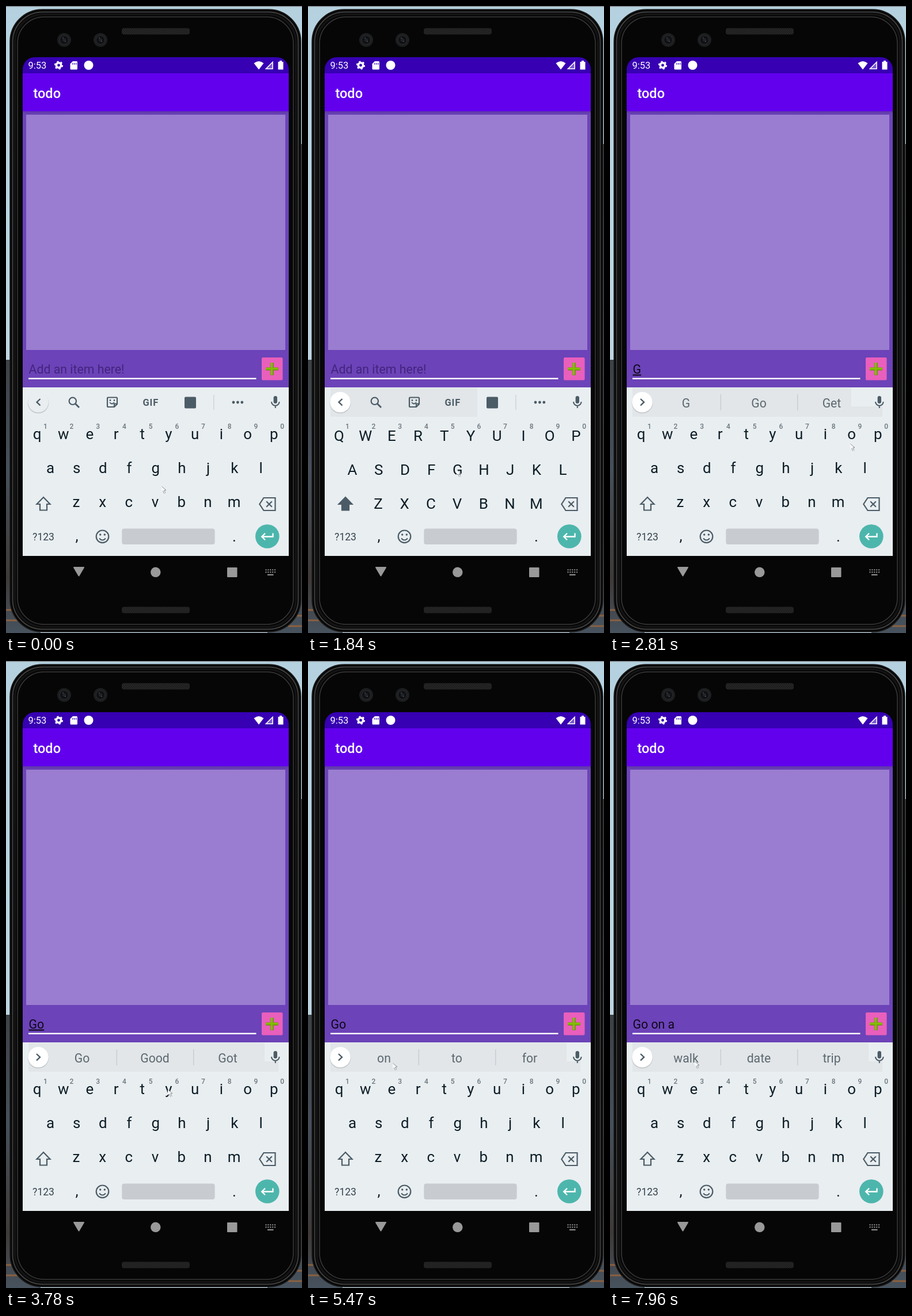
Write an HTML page that moves like this. It is 514 px wide and 1090 px high and loops after 8 s.

```html
<!DOCTYPE html>
<html lang="en">
<head>
<meta charset="utf-8">
<title>todo</title>
<style>
  html, body { margin: 0; width: 100%; height: 100%; overflow: hidden; background: #111; }
  svg { display: block; width: 514px; height: 1090px; font-family: Roboto, sans-serif; }
  .mid { text-anchor: middle; }
  .key { font-size: 25.9px; fill: #0c1d26; text-anchor: middle; }
  .hint { font-size: 12px; fill: #6b767c; font-weight: 500; text-anchor: middle; }
  .word { font-size: 21.2px; fill: #5c686f; text-anchor: middle; }
  .line { fill: none; stroke: #4b5c66; stroke-width: 2.2; }
  .icon { fill: #4b5c66; }
  .field { font-size: 21.3px; }
</style>
</head>
<body>
<svg viewBox="0 0 514 1090" xmlns="http://www.w3.org/2000/svg">
  <defs>
    <linearGradient id="sky" x1="0" y1="0" x2="0" y2="1">
      <stop offset="0" stop-color="#b5d1df"/><stop offset="1" stop-color="#c3d9e3"/>
    </linearGradient>
    <linearGradient id="town" x1="0" y1="0" x2="0" y2="1">
      <stop offset="0" stop-color="#3d4247"/><stop offset=".4" stop-color="#46505a"/>
      <stop offset=".8" stop-color="#3f3a37"/><stop offset="1" stop-color="#47535f"/>
    </linearGradient>
    <linearGradient id="shade" x1="0" y1="0" x2="0" y2="1">
      <stop offset="0" stop-color="#4d2c94" stop-opacity=".45"/><stop offset="1" stop-color="#4d2c94" stop-opacity="0"/>
    </linearGradient>
    <pattern id="mesh" width="4" height="4" patternUnits="userSpaceOnUse">
      <rect width="4" height="4" fill="#1d1d1d"/><path d="M0 0L4 4M4 0L0 4" stroke="#292929" stroke-width=".8"/>
    </pattern>
  </defs>

  <!-- wallpaper -->
  <rect width="514" height="1090" fill="url(#sky)"/>
  <rect y="615" width="60" height="475" fill="url(#town)"/>
  <rect x="454" y="240" width="60" height="850" fill="url(#town)"/>
  <path d="M0 1050H12M0 1068H20M500 1060H514M490 1078H514" stroke="#8a6040" stroke-width="3"/>
  <rect width="514" height="1.2" fill="#777"/>

  <!-- phone body -->
  <g fill="none">
    <rect x="7" y="6" width="505" height="1082" rx="56" fill="#070707" stroke="#1c1c1c" stroke-width="1.5"/>
    <rect x="11.5" y="10.5" width="496" height="1073" rx="52" stroke="#3f3f3f" stroke-width="2"/>
    <rect x="15.5" y="14.5" width="488" height="1065" rx="49" stroke="#141414" stroke-width="3"/>
    <rect x="20" y="19" width="479" height="1056" rx="46" fill="#060606" stroke="#3a3a3a" stroke-width="1.5"/>
  </g>
  <g fill="url(#mesh)">
    <rect x="201" y="38.5" width="118" height="11" rx="4"/>
    <rect x="201" y="1044.5" width="118" height="11" rx="4"/>
  </g>
  <g id="lenses"></g>

  <!-- app -->
  <path d="M29 117V110A21 21 0 0 1 50 89H470A21 21 0 0 1 491 110V117Z" fill="#3700b3"/>
  <rect x="29" y="183" width="462" height="480" fill="#6c43b8"/>
  <rect x="29" y="117" width="462" height="66" fill="#6200ee"/>
  <rect x="29" y="183" width="462" height="6" fill="url(#shade)"/>
  <rect x="35" y="189" width="450" height="409" fill="#9a7dd0"/>
  <text x="47.5" y="159.5" font-size="23.5" font-weight="500" fill="#fff">todo</text>
  <g fill="#fff">
    <text x="38.5" y="109" font-size="16.5">9:53</text>
    <circle cx="91.5" cy="103" r="4.2" fill="none" stroke="#fff" stroke-width="3.6"/>
    <circle cx="91.5" cy="103" r="6.6" fill="none" stroke="#fff" stroke-width="2" stroke-dasharray="3.2 3.71"/>
    <path d="M116 96H122.5Q124 96 124 97.5V109Q124 110.5 122.5 110.5H113Q111.5 110.5 111.5 109V100.5Z"/>
    <circle cx="143.5" cy="103" r="8"/>
    <path d="M430.5 99.5Q439 92.5 447.5 99.5L439 110.5Z"/>
    <path d="M464 95.5V110H449.5Z" fill-opacity=".35"/>
    <path d="M463 97.5V109.2H451.5Z" fill="none" stroke="#fff" stroke-width="1.5"/>
    <path d="M475 95H479V97H481.5V110.5H472.5V97H475Z"/>
  </g>
  <path d="M116 99V102M119 99V102M122 99V102" stroke="#3700b3" stroke-width="1.2"/>

  <!-- input row -->
  <text id="field" class="field" x="39.5" y="638.5"></text>
  <rect id="caret" y="615" width="2.3" height="31" fill="#03dac5"/>
  <rect x="39" y="646.5" width="395.5" height="2.4" fill="#fff"/>
  <rect x="444" y="611" width="36.5" height="39.5" rx="2" fill="#e95fbc"/>
  <path d="M462 620V642M451 631H473" stroke="#5c8f00" stroke-width="5"/>
  <path d="M461.5 620V641.5M451 630.5H472.5" stroke="#84bd00" stroke-width="3.6"/>

  <!-- keyboard -->
  <rect x="29" y="663" width="462" height="293" fill="#e9eef1"/>
  <path id="band" fill="#e2e6e9"/>
  <g id="tools">
    <circle class="line" cx="115.8" cy="686.8" r="6.2"/>
    <path class="line" d="M120.5 691.5L127 698" style="stroke-width:2.8"/>
    <path class="line" d="M177.5 680.5H191.5Q193 680.5 193 682V692L188 697H177.5Q176 697 176 695.5V682Q176 680.5 177.5 680.5ZM193 691.5H188V697"/>
    <path class="line" d="M180 689Q184 694 188 689" style="stroke-width:1.8"/>
    <circle class="icon" cx="181" cy="685.5" r="1.4"/><circle class="icon" cx="188" cy="685.5" r="1.4"/>
    <text class="mid icon" x="251.4" y="694.5" font-size="16.5" font-weight="700" letter-spacing=".9">GIF</text>
    <rect class="icon" x="310" y="679.5" width="20" height="20" rx="2"/>
    <path d="M360.8 676V702" stroke="#c9ced1" stroke-width="1.2"/>
    <path d="M395 689H410" class="line" stroke-linecap="round" stroke-dasharray="0 7.4" style="stroke-width:4.8"/>
  </g>
  <g id="words">
    <path d="M192.3 675V703M325.8 675V703" stroke="#c4c9cc" stroke-width="1.2"/>
    <text class="word" x="132" y="697.5"></text>
    <text class="word" x="258.5" y="697.5"></text>
    <text class="word" x="385" y="697.5"></text>
  </g>
  <circle cx="56" cy="690" r="18.3" fill="#c3c8cb"/>
  <circle id="knob" cx="56" cy="688.7" r="17.8"/>
  <path id="chevron" class="line" style="stroke-width:2.4"/>
  <rect class="icon" x="464.6" y="678" width="6.4" height="13" rx="3.2"/>
  <path class="line" d="M461 688A6.8 6.8 0 0 0 474.6 688M467.8 695V699" style="stroke-width:2"/>

  <g id="keys"></g>
  <path id="shift" class="line" d="M65 854L76.5 866H71V876.5H59V866H53.5Z"/>
  <path class="line" d="M447.5 855H467.5V877H447.5L440.3 866ZM452.2 861.2L461.8 870.8M461.8 861.2L452.2 870.8"/>
  <text class="mid" x="65" y="928.5" font-size="17.5" fill="#34444d">?123</text>
  <text class="key" x="123" y="929.5">,</text>
  <text class="key" x="396.5" y="930.5">.</text>
  <circle class="line" cx="167.5" cy="922.3" r="10.8"/>
  <path class="line" d="M162 925.5Q167.5 931.5 173 925.5" style="stroke-width:2"/>
  <circle class="icon" cx="163.7" cy="919" r="1.7"/><circle class="icon" cx="171.3" cy="919" r="1.7"/>
  <rect x="201.3" y="908.5" width="161.3" height="27.5" rx="4" fill="#c8ccd0"/>
  <circle cx="453.8" cy="922" r="20.8" fill="#4db6ac"/>
  <path d="M463.5 916.5V922.5H444.5M450 916.7L444.2 922.5L450 928.3" fill="none" stroke="#fff" stroke-width="2.3"/>

  <!-- navigation bar -->
  <g fill="#999">
    <path d="M118 976H135L126.5 990.5Z" stroke="#999" stroke-width="2" stroke-linejoin="round"/>
    <circle cx="259.8" cy="984.3" r="8.7"/>
    <rect x="384" y="976" width="17.5" height="17" rx="1"/>
  </g>
  <path d="M450.5 980.3H468M450.5 984.3H468" stroke="#999" stroke-width="2" stroke-dasharray="2 1.9"/>
  <path d="M454 988.8H464.5" stroke="#999" stroke-width="2"/>

  <g id="pointer">
    <path d="M0 0V9.5L2.4 7.7L5 12.7L7 11.7L4.7 7L8 6.7Z" fill="#f6f8f9"/>
    <path d="M.5 .3L8 6.7L4.7 7L7 11.7M2.4 7.7L5 12.7" fill="none" stroke="#666" stroke-width=".7"/>
  </g>
</svg>
<script>
const LOOP = 8000;
const $ = id => document.getElementById(id);

$('lenses').innerHTML = [101, 164].map(x => `
  <circle cx="${x}" cy="59" r="12" fill="#1d1e20"/>
  <circle cx="${x}" cy="59" r="7.5" fill="#0f1012" stroke="#2b2d30"/>
  <circle cx="${x}" cy="59" r="3" fill="#202429"/>
  <path d="M${x - 3} 56l2 -1M${x + 1} 62l2 -1" stroke="#65686c"/>`).join('');

const PITCH = 45.7;
const rows = [['qwertyuiop', 54, 747], ['asdfghjkl', 77, 806], ['zxcvbnm', 122, 865]];
$('keys').innerHTML = rows.map(([letters, left, y], row) =>
  [...letters].map((c, i) => {
    const x = left + i * PITCH;
    const hint = row ? '' : `<text class="hint" x="${x + 14.3}" y="735">${(i + 1) % 10}</text>`;
    return `<text class="key letter" data-c="${c}" data-y="${y}" x="${x}">${c}</text>${hint}`;
  }).join('')).join('');
const letters = [...document.querySelectorAll('.letter')];
const words = [...document.querySelectorAll('.word')];

// time, text, caret x, suggestions
const typing = [
  [0, '', 39, null],
  [2240, 'G', 53, ['G', 'Go', 'Get']],
  [3230, 'Go', 65.5, ['Go', 'Good', 'Got']],
  [4920, 'Go ', 71, ['on', 'to', 'for']],
  [6170, 'Go on ', 100, ['a', 'the', 'a date']],
  [7150, 'Go on a ', 117, ['walk', 'date', 'trip']]
];
// time, caps on
const caps = [[0, false], [1140, true], [2240, false]];
// time, caret shown
const blink = [
  [0, 0], [120, 1], [580, 0], [1140, 1], [1570, 0], [2110, 1], [2660, 0], [3090, 1],
  [3640, 0], [4170, 1], [5330, 0], [5750, 1], [6450, 0], [6880, 1], [7430, 0]
];
// time, pointer tip
const path = [
  [0, 270, 835], [120, 279, 835], [440, 240, 842], [580, 180, 855], [720, 110, 866],
  [860, 64, 870], [1570, 100, 855], [1710, 200, 822], [1840, 258, 806], [2380, 330, 785],
  [2510, 395, 766], [2660, 412, 761], [2810, 417, 761], [3500, 380, 757], [3640, 320, 750],
  [3780, 281, 745], [3910, 282, 850], [4050, 285, 912], [4170, 300, 918], [4320, 311, 919],
  [5060, 270, 850], [5190, 200, 760], [5330, 160, 715], [5470, 147, 699], [6450, 130, 695],
  [6600, 117, 692], [7430, 118, 710], [7560, 135, 790], [7700, 151, 760], [7830, 151, 718],
  [7960, 147, 696]
];
const at = (steps, t) => steps.findLast(s => s[0] <= t);
const show = (el, on) => { el.style.display = on ? '' : 'none'; };

function setCase(upper) {
  for (const el of letters) {
    el.textContent = upper ? el.dataset.c.toUpperCase() : el.dataset.c;
    el.setAttribute('y', +el.dataset.y + (upper ? 9 : 6));
  }
  $('shift').style.fill = upper ? '#4b5c66' : 'none';
}

function setTyping([, text, x, list]) {
  const field = $('field');
  field.textContent = text.trim() || 'Add an item here!';
  field.setAttribute('fill', text ? '#0d0818' : '#43257e');
  field.setAttribute('text-decoration', text && !text.endsWith(' ') ? 'underline' : 'none');
  $('caret').setAttribute('x', x);
  show($('tools'), !list);
  show($('words'), list);
  if (list) words.forEach((el, i) => { el.textContent = list[i]; });
  $('chevron').setAttribute('d', list ? 'M53 683L59 688.7L53 694.5' : 'M59.5 683L53.5 688.7L59.5 694.5');
}

function setBand(t) {
  const notch = t < 3230 ? 419 : 449;
  const d = t < 1140 ? '' : t < 2240 ? 'M39 664H294V714H39Z'
    : `M39 664H${notch}V696H473V714H39Z`;
  $('band').setAttribute('d', d);
  $('knob').setAttribute('fill', t < 1140 ? '#e9eef1' : '#fff');
}

let lastTyping, lastCaps;
function draw(t) {
  const typed = at(typing, t), upper = at(caps, t)[1], [, x, y] = at(path, t);
  if (typed !== lastTyping) setTyping(lastTyping = typed);
  if (upper !== lastCaps) setCase(lastCaps = upper);
  setBand(t);
  show($('caret'), at(blink, t)[1]);
  $('pointer').setAttribute('transform', `translate(${x} ${y})`);
}

const start = performance.now();
function tick() {
  draw((performance.now() - start) % LOOP);
  requestAnimationFrame(tick);
}
tick();
</script>
</body>
</html>
```
